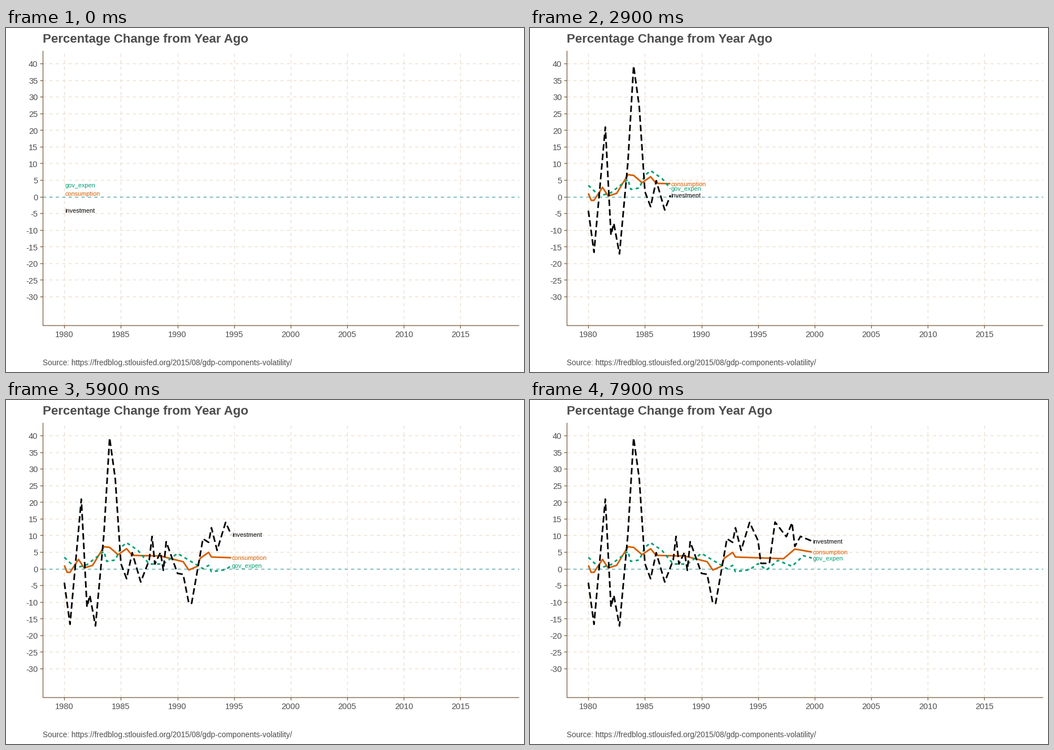
Write a matplotlib script that moves like this. It is 917 by 611 pixels and loops after 8 s.

```python
import matplotlib.pyplot as plt
import numpy as np
from matplotlib.animation import FuncAnimation

W, H, DPI = 917, 611, 64
LEFT, RIGHT, TOP, BOTTOM = 65, 908, 40, 528
TEXT, AXIS, GRID, ZERO = "#4D4D4D", "#826A50", "#EBE0D2", "#56AEB2"
THIN, THICK = 1.42, 2.845
QUARTERS = 80

# Turning points (quarter since 1980, percent); straight runs in between.
CONSUMPTION = [(0, 1), (1, -1.1), (2, -1.1), (5, 2.8), (7, 0.2), (10, 1), (14, 6.6), (16, 6.4),
               (19, 4.2), (22, 6), (24, 4), (34, 3.8), (42, 2.1), (44, -0.4), (47, 0.7),
               (48, 3.1), (51, 4.9), (52, 3.5), (69, 3), (73, 5.9), (79, 5)]
GOV_EXPEN = [(0, 3.4), (4, 0.2), (8, 1.2), (14, 5.2), (15, 2.2), (18, 2.6), (20, 6.4), (22, 7.8),
             (26, 5.5), (30, 1.4), (35, 1.4), (40, 4.6), (49, 0), (51, 1), (52, -0.9), (57, -0.3),
             (60, 1.5), (63, -0.4), (67, 2.5), (72, 0.7), (76, 3.9), (79, 3.2)]
INVESTMENT = [(0, -4.2), (2, -16.7), (6, 20.9), (8, -11.5), (9, -8), (11, -17.2), (14, 10.5),
              (16, 39.3), (18, 27), (20, 1.5), (22, -3), (24, 4.8), (27, -4), (30, 2.6), (31, 9.7),
              (32, 1.4), (34, 4.9), (35, -0.5), (36, 8.1), (40, -1.4), (42, -1.7), (44, -10.4),
              (45, -10.4), (49, 9), (51, 7.9), (52, 12.3), (54, 5.5), (57, 13.9), (60, 8.4),
              (61, 1.6), (64, 1.6), (66, 14), (70, 9.6), (72, 13.8), (73, 6.7), (75, 9.7), (79, 8.3)]
SERIES = [
    ("consumption", CONSUMPTION, "#D55E00", "-"),
    ("gov_expen", GOV_EXPEN, "#009E73", (0, (2, 2))),
    ("investment", INVESTMENT, "#000000", (0, (4, 2))),
]

plt.rcParams["font.family"] = "Liberation Sans"
fig = plt.figure(figsize=(W / DPI, H / DPI), dpi=DPI, facecolor="white")
ax = fig.add_axes([0, 0, 1, 1])
ax.set_xlim(0, W)
ax.set_ylim(H, 0)
ax.axis("off")


def pt(px):
    return px * 72 / DPI


def px_x(year):
    return 103.3 + (year - 1980) * 20.03


def px_y(value):
    return 299.6 - value * 5.914


def line(xs, ys, color, width=THIN, style="-", z=1):
    return ax.plot(xs, ys, color=color, lw=pt(width), ls=style, zorder=z,
                   solid_capstyle="butt", dash_capstyle="butt",
                   solid_joinstyle="round", dash_joinstyle="round")[0]


def text(x, y, s, size, color=TEXT, **kw):
    return ax.text(x, y, s, fontsize=pt(size), color=color, va="baseline", **kw)


dashed = (0, (4, 4))
for value in range(-30, 41, 5):
    y = px_y(value)
    line([LEFT, RIGHT], [y, y], GRID, style=dashed)
    line([LEFT - 5, LEFT], [y, y], AXIS, z=3)
    text(56.5, y + 6.2, str(value), 14.67, ha="right")
for year in range(1980, 2016, 5):
    x = px_x(year)
    line([x, x], [BOTTOM, TOP], GRID, style=dashed)
    line([x, x], [BOTTOM, BOTTOM + 5], AXIS, z=3)
    text(x, 549.3, str(year), 14.67, ha="center")
line([LEFT, RIGHT], [px_y(0)] * 2, ZERO, style=dashed, z=2)
line([LEFT, LEFT, RIGHT], [TOP, BOTTOM, BOTTOM], AXIS, z=3)
text(65, 26, "Percentage Change from Year Ago", 22.2, weight="bold")
text(65, 598.5, "Source: https://fredblog.stlouisfed.org/2015/08/gdp-components-volatility/", 13.67)

quarters = np.arange(QUARTERS)
xs = px_x(1980 + quarters / 4)
tracks = []
for k, (name, turns, color, style) in enumerate(SERIES):
    ys = px_y(np.interp(quarters, *zip(*turns)))
    curve = line([], [], color, THICK, style, 4 + k)
    label = text(0, 0, name, 10.9, color, zorder=8 + k)
    tracks.append((curve, label, ys))


def update(i):
    shown = i + 1 if i else 0
    for curve, label, ys in tracks:
        curve.set_data(xs[:shown], ys[:shown])
        label.set_position((xs[i] + 1.2, ys[i] + 4))
    return [artist for track in tracks for artist in track[:2]]


anim = FuncAnimation(fig, update, frames=QUARTERS, interval=100, repeat=True, repeat_delay=0)
plt.show()
```
